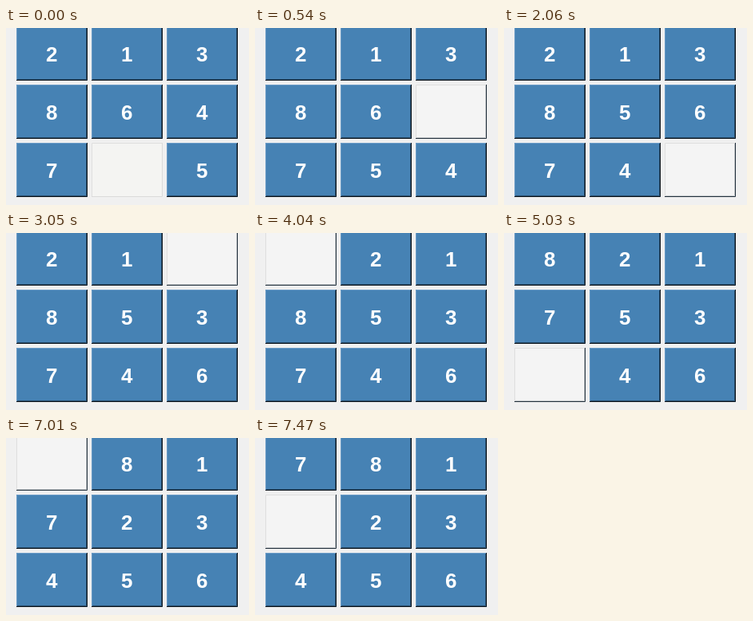
An HTML page that plays this animation: 304x222 px, repeating every 8 s.

```html
<!DOCTYPE html>
<html lang="en">
<head>
<meta charset="utf-8">
<title>Sliding puzzle</title>
<style>
  html, body { margin: 0; width: 100%; height: 100%; overflow: hidden; background: #f0f0f0; }
  svg { display: block; width: 304px; height: 222px; }
  text { font: bold 26px "Liberation Sans", Arial, sans-serif; fill: #fff; text-anchor: middle; }
</style>
</head>
<body>
<svg id="stage" viewBox="0 0 304 222"></svg>
<script>
const LOOP = 8000;
const W = 89, H = 68;
const START = [2, 1, 3, 8, 6, 4, 7, 0, 5];
// [time in ms, cell the gap moves to]
const MOVES = [
  [60, 8], [540, 5], [1200, 4], [1530, 7], [2060, 8], [2520, 5], [3050, 2], [3510, 1],
  [4040, 0], [4500, 3], [5030, 6], [5490, 7], [6020, 4], [6480, 1], [7010, 0], [7470, 3]
];
const BLUE = { face: '#4682b4', light: '#6c9dc8', shade: '#2a4e6c', edge: '#0b141c' };
const GAP = { face: '#f4f4f4', light: '#dedede', shade: '#c4c8cb', edge: '#22303c' };
const FLAT_GAP = { face: '#f4f4f2', light: '#dedede', shade: '#f4f4f2', edge: '#dadada' };

const stage = document.getElementById('stage');

function add(parent, tag, attrs) {
  const el = document.createElementNS('http://www.w3.org/2000/svg', tag);
  for (const key in attrs) el.setAttribute(key, attrs[key]);
  return parent.appendChild(el);
}

function makeCell(i) {
  const g = add(stage, 'g', {
    transform: `translate(${13 + 94 * (i % 3)} ${-2 + 73 * Math.floor(i / 3)})`
  });
  const line = d => add(g, 'path', { d, fill: 'none', 'stroke-width': 1 });
  return {
    face: add(g, 'rect', { width: W, height: H }),
    light: line(`M.5 ${H - 1}V.5H${W - 1}`),
    shade: line(`M1 ${H - 1.5}H${W - 1.5}V1`),
    edge: line(`M0 ${H - 0.5}H${W - 0.5}V0`),
    label: add(g, 'text', { x: 44.2, y: 43.6 })
  };
}

const cells = START.map((_, i) => makeCell(i));

function boardAt(t) {
  const board = START.slice();
  for (const [time, to] of MOVES) {
    if (t < time) break;
    board[board.indexOf(0)] = board[to];
    board[to] = 0;
  }
  return board;
}

function render(t) {
  const gap = t < MOVES[0][0] ? FLAT_GAP : GAP;
  boardAt(t).forEach((n, i) => {
    const cell = cells[i], look = n ? BLUE : gap;
    cell.face.setAttribute('fill', look.face);
    for (const part of ['light', 'shade', 'edge']) cell[part].setAttribute('stroke', look[part]);
    cell.label.textContent = n || '';
  });
}

const begin = performance.now();
function tick() {
  render((performance.now() - begin) % LOOP);
  requestAnimationFrame(tick);
}
tick();
</script>
</body>
</html>
```
